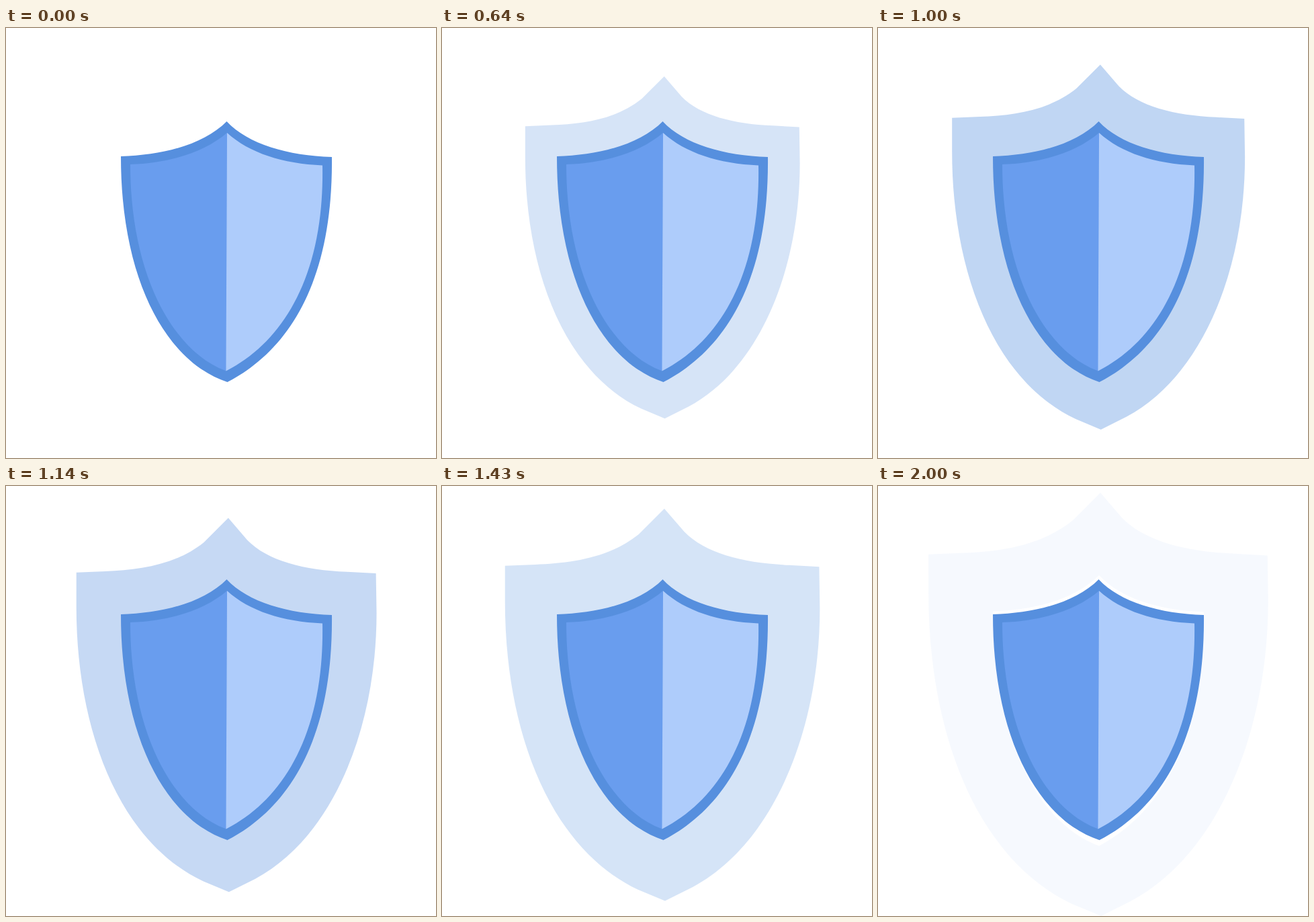
Write an HTML page that moves like this. It is 640 by 640 pixels and loops after 2.43 s.

```html
<!DOCTYPE html>
<html lang="en">
<head>
<meta charset="utf-8">
<title>Pulsing shield</title>
<style>
  html, body { margin: 0; width: 100%; height: 100%; overflow: hidden; background: #fff; }
  svg { display: block; width: 100%; height: 100%; }
</style>
</head>
<body>
<svg viewBox="0 0 640 640">
  <!-- Ring with a shield-shaped hole that opens up late in the pulse -->
  <path id="halo" fill="#5690de" fill-rule="evenodd" opacity="0" d="
    M331 20 L291 60 C245 97 185 105 130 107 L83 109 V165
    C83 365 152 548 290 613 L332 630.5 L375 609
    C502 541 573 363 573 175 L572 110.5 L525 108
    C455 105 395 90 362 56 Z
    M329 139 C296 173 238 189 176 191 C176 378 243 498 329 529.5
    C417 482 482 380 480 192 C418 190 360 173 329 139 Z"/>
  <path fill="#568fde" d="M328.5 139 C295 173 235 189 171 191 C171 379 241 498 329.5 527
    C419 481 487 380 485 192 C420 190 360 173 328.5 139 Z"/>
  <path fill="#699dee" d="M329 156 C295 185 245 200.5 185 203 C185 368 249 482 328 510.5 Z"/>
  <path fill="#aeccfb" d="M329 156 C362 186 412 202 471 204.5 C474 368 413 467 327.5 510.5 Z"/>
</svg>
<script>
const LOOP = 2430;
const STEP = 500 / 7;
const START = 180, PEAK = 925, END = 1915;
const PEAK_ALPHA = 0.39;
const halo = document.getElementById('halo');

function haloAlpha(t) {
  if (t < START) return 0;
  if (t < PEAK) return PEAK_ALPHA * (t - START) / (PEAK - START);
  const u = (t - PEAK) / (END - PEAK);
  return PEAK_ALPHA - 0.22 * u - 0.12 * u * u;
}

function draw(now) {
  // The motion advances at 14 steps per second and then holds its last pose.
  const t = Math.min(Math.floor((now % LOOP + 5) / STEP) * STEP, END);
  const scale = 1 + 0.0001554 * (t - 1710);
  halo.setAttribute('opacity', haloAlpha(t));
  halo.setAttribute('transform',
    `translate(329.5 333) scale(${scale}) translate(-329.5 -333)`);
}

const origin = performance.now();
function tick() {
  draw(performance.now() - origin);
  requestAnimationFrame(tick);
}
tick();
</script>
</body>
</html>
```
